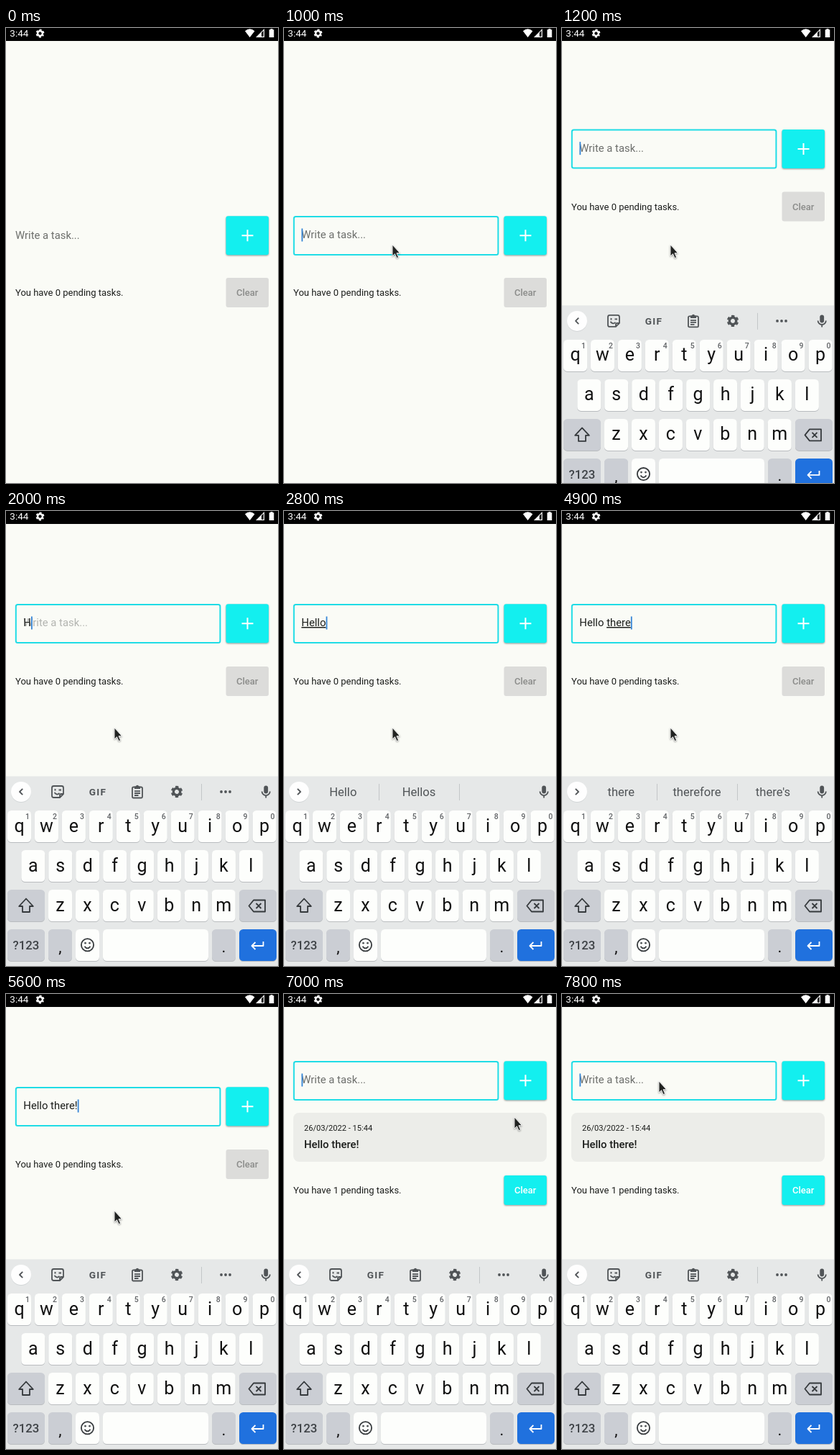
These frames come from a looping animation (379 px wide and 632 px high, 8 s). An HTML page:

```html
<!DOCTYPE html>
<html lang="en">
<head>
<meta charset="utf-8">
<title>Task list</title>
<style>
  html, body { margin: 0; width: 100%; height: 100%; overflow: hidden; background: #fafbf6; }
  svg { display: block; width: 379px; height: 632px; }
  text { font-family: Roboto, sans-serif; white-space: pre; }
  .field { font-size: 14.85px; fill: #1b1d1b; }
  .hint { fill: #6d6f6c; }
  .note { font-size: 13px; fill: #1b1d1b; }
  .btn { fill: #13efef; }
  .off { fill: #dcdcda; }
  .raised { filter: drop-shadow(0 1px 1px rgba(0, 0, 0, .4)); }
  .mid { text-anchor: middle; }
  .medium { font-weight: 500; }
  .key { fill: #fdfefc; }
  .key.dim { fill: #cbced4; }
  .key.go { fill: #2071de; }
  .edge { fill: #b9bcbf; }
  .letter { font-size: 25px; fill: #111; }
  .point { font-size: 22px; fill: #111; }
  .digit { font-size: 10.5px; fill: #606366; font-weight: 500; }
  .sugg { font-size: 16.6px; fill: #505457; }
  .line { fill: none; stroke: #505457; stroke-width: 1.8; stroke-linejoin: round; }
  .dark { stroke: #35393c; }
  .fill { fill: #505457; }
  .rule { stroke: #c3c6c8; }
</style>
</head>
<body>
<svg viewBox="0 0 379 632">
  <defs>
    <g id="gear" fill="none" transform="rotate(30)">
      <circle r="4.7" stroke-width="3.4"/>
      <circle r="7" stroke-width="2.4" stroke-dasharray="4.2 3.13" stroke-dashoffset="2.1"/>
    </g>
  </defs>
  <rect width="379" height="632" fill="#fafbf6"/>

  <g id="top">
    <rect id="frame" x="13.8" y="261.9" width="284.6" height="53" rx="2.5" fill="none" stroke="#1fdce6" stroke-width="2"/>
    <text id="hint" class="field hint">Write a task...</text>
    <text id="text" class="field" x="24.3" y="292"><tspan id="done"></tspan><tspan id="word" text-decoration="underline"></tspan></text>
    <rect id="caret" y="278.5" width="1.8" height="18" fill="#3585d6"/>
    <rect class="btn raised" x="306.5" y="261.3" width="59.5" height="54" rx="3"/>
    <path d="M328.5 288.3h16M336.5 280.3v16" stroke="#fff" stroke-width="2"/>
  </g>

  <g id="card">
    <rect x="13" y="165" width="353" height="68" rx="8" fill="#ecede9"/>
    <text x="28" y="190" font-size="11.1" fill="#1b1d1b">26/03/2022 - 15:44</text>
    <text class="field medium" x="28" y="214">Hello there!</text>
  </g>

  <g id="bottom">
    <text id="count" class="note" x="13" y="372"></text>
    <rect id="clear" x="306.5" y="347" width="59.5" height="41" rx="3"/>
    <text id="clearText" class="note medium mid" x="336.2" y="372">Clear</text>
  </g>

  <g id="keyboard">
    <rect y="368.5" width="379" height="270" fill="#e6e8e8"/>
    <circle cx="21" cy="391" r="14" fill="#d3d6d7"/>
    <circle cx="21" cy="390" r="14" fill="#fefefe"/>
    <path id="chevron" class="line" d="M2.2 -4.2L-2 0 2.2 4.2"/>
    <g id="tools">
      <g class="line" transform="translate(72 390)">
        <path d="M-5.5 -8H5.5Q8 -8 8 -5.5V3L3 8H-5.5Q-8 8 -8 5.5V-5.5Q-8 -8 -5.5 -8ZM8 3H5Q3 3 3 5V8"/>
        <path d="M-4.5 1Q-1 5.5 2.5 2M-3.5 -4v2.5M1.5 -2.5h3.5"/>
      </g>
      <text class="fill mid" x="128" y="395" font-size="13.6" font-weight="700" letter-spacing="1.2">GIF</text>
      <g transform="translate(183 390)">
        <rect class="line" x="-7" y="-6.5" width="14" height="15" rx="1.5"/>
        <path class="fill" d="M-4 -7.5H-2.2A2.3 2.3 0 0 1 2.2 -7.5H4V-4H-4Z"/>
        <path class="line" d="M-4 -.8H4M-4 2H4M-4 5H1.5"/>
      </g>
      <use href="#gear" x="238" y="390" stroke="#505457" transform="translate(238 390) scale(1) translate(-238 -390)"/>
      <path class="rule" d="M272.5 379v23"/>
      <g class="fill"><circle cx="300" cy="390" r="1.9"/><circle cx="306" cy="390" r="1.9"/><circle cx="312" cy="390" r="1.9"/></g>
    </g>
    <g id="suggestions">
      <path class="rule" d="M132.5 379v23M244.5 379v23"/>
      <text class="sugg mid" x="82.3" y="396"></text>
      <text class="sugg mid" x="188" y="396"></text>
      <text class="sugg mid" x="294" y="396"></text>
    </g>
    <rect class="fill" x="359.3" y="381.5" width="5.8" height="11" rx="2.9"/>
    <path class="line" d="M356.6 389.5a5.6 5.6 0 0 0 11.2 0M362.2 395v3.5"/>
    <g id="keys"></g>
    <path class="line dark" transform="translate(28 548)" d="M0 -9.5L-9.8 1H-5V9H5V1H9.8Z"/>
    <path class="line dark" transform="translate(350 548.5)" d="M-5 -8H11V8H-5L-11.5 0ZM-1.5 -3.5l7 7m0 -7l-7 7"/>
    <text class="mid medium" x="28" y="609" font-size="16.8" fill="#3f4347">?123</text>
    <g class="line dark" transform="translate(113.5 602.7)">
      <circle r="8.6"/>
      <path d="M-4 2Q0 7.5 4 2"/>
      <g class="fill" stroke="none"><circle cx="-3" cy="-2.5" r="1.4"/><circle cx="3" cy="-2.5" r="1.4"/></g>
    </g>
    <path class="line" style="stroke:#fff" d="M358.5 598v6H343M347.5 599l-5 5 5 5"/>
  </g>

  <rect width="379" height="18" fill="#000"/>
  <text x="5.3" y="12.3" font-size="13.5" fill="#fff">3:44</text>
  <use href="#gear" transform="translate(47.5 7.5) scale(.72)" stroke="#fff"/>
  <path fill="#fff" d="M333 4.2Q339.7 -1.6 346.5 4.2L339.7 13ZM360 1V13H348ZM368.5 1h3v1.2h1.8V13h-6.6V2.2h1.8Z"/>
  <path d="M356 6.5L358.8 3.7V11.8H356Z"/>

  <path id="mouse" d="M0 0V16L3.5 12.7 6.1 18.6 8.6 17.5 6 11.7H10.6Z" fill="#202220" stroke="#fff" stroke-width=".9" class="raised"/>
</svg>
<script>
const LOOP = 8000, STEP = 100;
const FOCUS = 1000, ADDED = 7000;
const $ = id => document.getElementById(id);

// Keys: letter rows by rule, special keys one by one.
const PITCH = 37.95, KEY_W = 33, KEY_H = 44;
function key(x, y, w, kind = '') {
  const box = (cls, top) =>
    `<rect class="${cls}" x="${x}" y="${top}" width="${w}" height="${KEY_H}" rx="5.5"/>`;
  return box('edge', y + 1) + box('key ' + kind, y);
}
function label(ch, x, y, cls) {
  return `<text class="${cls} mid" x="${x}" y="${y}">${ch}</text>`;
}
function row(letters, x0, y, digits) {
  return [...letters].map((ch, i) => {
    const x = x0 + i * PITCH, mid = x + KEY_W / 2;
    const digit = digits ? label((i + 1) % 10, mid + 11.5, y + 12, 'digit') : '';
    return key(x, y, KEY_W) + label(ch, mid, y + 29.5, 'letter') + digit;
  }).join('');
}
$('keys').innerHTML =
  row('qwertyuiop', 2, 416, true) + row('asdfghjkl', 21.3, 471) + row('zxcvbnm', 59, 526) +
  key(2, 526, 52, 'dim') + key(325, 526, 52, 'dim') +
  key(2, 581, 52, 'dim') + key(59, 581, KEY_W, 'dim') + key(97, 581, KEY_W) +
  key(135, 581, 147) + key(287, 581, KEY_W, 'dim') + key(325, 581, 52, 'go') +
  label(',', 75.5, 613, 'point') + label('.', 303.3, 612.5, 'point');

const ramp = (t, from, to) => Math.min(1, Math.max(0, (t - from) / (to - from)));
const easeOut = (u, power) => 1 - (1 - u) ** power;

// Pointer: starts at 300 ms, then glides to each stop.
const entry = { x: 218, y: 328 };
const glides = [
  { from: 300, to: 700, x: 151, y: 301 },
  { from: 5900, to: 6700, x: 321, y: 171 },
  { from: 7000, to: 7200, x: 156, y: 172 },
  { from: 7300, to: 7800, x: 135, y: 121 },
];
function pointer(t) {
  return glides.reduce((p, g) => {
    const k = easeOut(ramp(t, g.from, g.to), 3);
    return { x: p.x + (g.x - p.x) * k, y: p.y + (g.y - p.y) * k };
  }, entry);
}

// Typing: each burst adds one letter per step.
const bursts = [[2000, 'H'], [2500, 'ello'], [3000, ' '], [3700, 'there'], [5500, '!']];
function typing(t) {
  let text = '', last = t;
  for (const [from, letters] of bursts) {
    const n = Math.min(letters.length, Math.floor((t - from) / STEP) + 1);
    if (n < 1) break;
    text += letters.slice(0, n);
    last = from + (n - 1) * STEP;
  }
  return t < ADDED ? { text, last } : { text: '', last: ADDED };
}
const caretOn = idle => idle % 800 < 500;

const vocabulary = ['Hello', 'Hellos', 'Helpful', 'there', 'this', 'therefore', "there's"];
function suggest(word) {
  if (!word) return ['I', 'how', 'there'];
  return [word, ...vocabulary.filter(v => v !== word && v.startsWith(word))];
}

const set = (id, attrs) => {
  for (const name in attrs) $(id).setAttribute(name, attrs[name]);
};
const move = (id, x, y) => set(id, { transform: `translate(${x} ${y})` });
const slots = $('suggestions').querySelectorAll('text');

function draw(t) {
  const focused = t >= FOCUS, added = t >= ADDED;
  const { x, y } = pointer(t);
  move('mouse', x, y);
  set('mouse', { opacity: +(t >= entry.y - 28) });

  // The keyboard slides in and the centred layout follows it up.
  const slide = ramp(t, FOCUS, FOCUS + 400);
  const lift = easeOut(slide, 3.5), grow = added ? 36 : 0;
  move('keyboard', 0, 270 * (1 - easeOut(slide, 4)));
  move('top', 0, -132 * lift - grow);
  move('bottom', 0, -131 * lift + grow);

  const { text, last } = typing(t);
  const tools = 1 - ramp(t, 2000, 2200) + ramp(t, 5400, 5600);
  const word = tools < 1 ? text.match(/\w*$/)[0] : '';
  $('done').textContent = text.slice(0, text.length - word.length);
  $('word').textContent = word;
  set('frame', { opacity: +focused });
  set('hint', {
    x: focused ? 24.3 : 13, y: focused ? 292 : 293,
    opacity: added ? 1 : 1 - ramp(t, 1900, 2100),
  });
  set('caret', {
    x: 24.4 + $('text').getComputedTextLength(),
    opacity: +(focused && caretOn(t - last)),
  });

  set('tools', { opacity: tools });
  set('suggestions', { opacity: 1 - tools });
  set('chevron', { transform: `translate(21 390) scale(${tools < 1 ? -1 : 1} 1)` });
  const words = suggest(word);
  slots.forEach((slot, i) => { slot.textContent = words[i] || ''; });

  set('card', { opacity: +added });
  $('count').textContent = `You have ${+added} pending tasks.`;
  set('clear', { class: added ? 'btn raised' : 'off' });
  $('clearText').style.fill = added ? '#fff' : '#8b8c8a';
}

const start = performance.now();
function tick() {
  const t = (performance.now() - start) % LOOP;
  draw(Math.floor(t / STEP) * STEP);
  requestAnimationFrame(tick);
}
tick();
</script>
</body>
</html>
```
